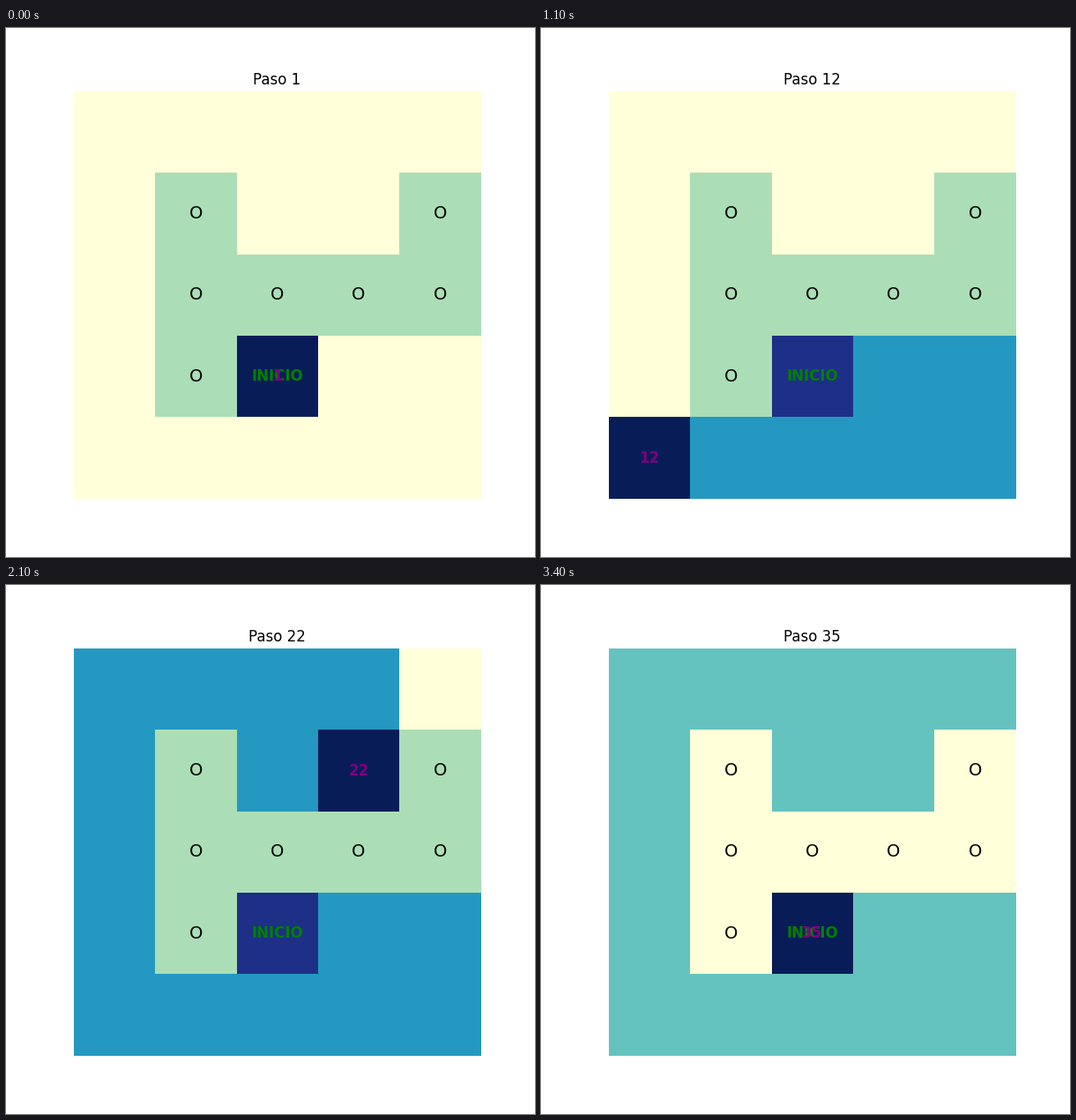
Recreate the animation shown at these times as a matplotlib script. Size 600 px wide and 600 px high, loop 3500 ms.

```python
import matplotlib.pyplot as plt
import numpy as np
from matplotlib.animation import FuncAnimation

SIZE = 5
START = (3, 2)
WALLS = [(1, 1), (1, 4), (2, 1), (2, 2), (2, 3), (2, 4), (3, 1)]
MOVES = [(-1, 0), (1, 0), (0, -1), (0, 1)]
WALL, VISITED, HOME, CURRENT = 0.3, 0.6, 0.9, 1.0


def unvisited(cell, seen):
    around = [(cell[0] + dr, cell[1] + dc) for dr, dc in MOVES]
    return [p for p in around
            if min(p) >= 0 and max(p) < SIZE and p not in WALLS and p not in seen]


def explore():
    """Depth-first walk with backtracking, most open neighbour first."""
    route, stack, seen = [START], [START], {START}
    while stack:
        options = unvisited(stack[-1], seen)
        if options:
            cell = max(options, key=lambda p: len(unvisited(p, seen)))
            seen.add(cell)
            stack.append(cell)
        else:
            stack.pop()
        if stack:
            route.append(stack[-1])
    return route


def grid_at(step):
    grid = np.zeros((SIZE, SIZE))
    for cell in WALLS:
        grid[cell] = WALL
    for cell in route[:step + 1]:
        grid[cell] = VISITED
    grid[START] = HOME
    grid[route[step]] = CURRENT
    return grid


def label(cell, text, **style):
    return ax.text(cell[1], cell[0], text, ha="center", va="center", **style)


plt.rcParams["font.family"] = "DejaVu Sans"
route = explore()

fig, ax = plt.subplots(figsize=(6, 6), dpi=100)
ax.axis("off")
image = ax.imshow(grid_at(0), cmap="YlGnBu")
title = ax.set_title("Paso 1", fontsize=12)
for wall in WALLS:
    label(wall, "O", color="black", fontsize=14)
label(START, "INICIO", color="green", fontsize=12, weight="bold")
counter = label(START, "1", color="purple", fontsize=12, weight="bold")


def update(step):
    image.set_data(grid_at(step))
    image.autoscale()  # the scale shifts once no cell is left empty
    row, col = route[step]
    counter.set_position((col, row))
    counter.set_text(str(step + 1))
    title.set_text(f"Paso {step + 1}")
    return image, title, counter


anim = FuncAnimation(fig, update, frames=len(route), interval=100, repeat=True)
plt.show()
```
